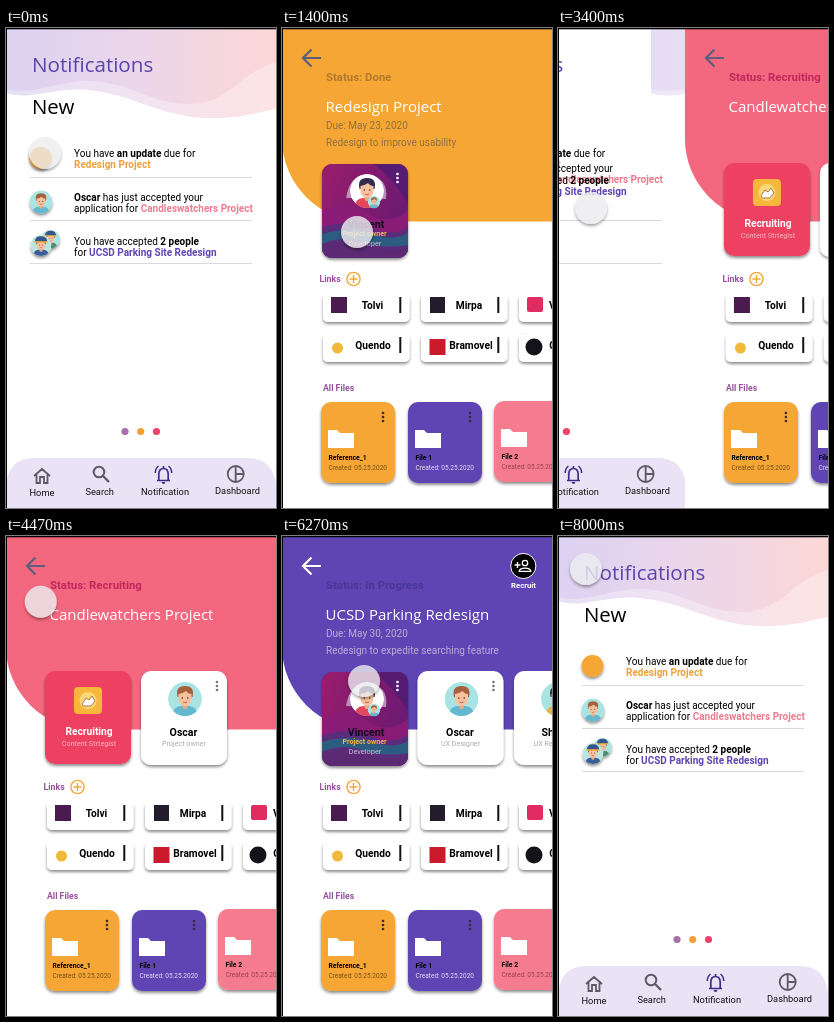
An HTML page that plays this animation: 270x480 px, repeating every 8.54 s.

```html
<!DOCTYPE html>
<html lang="en">
<head>
<meta charset="utf-8">
<title>Project notifications</title>
<style>
  html, body { margin: 0; width: 100%; height: 100%; overflow: hidden; background: #fff; }
  svg { display: block; width: 270px; height: 480px; font-family: Roboto, Arial, sans-serif; }
  .title { font-family: "Open Sans", "Noto Sans", sans-serif; font-weight: 500; }
  .b { font-weight: 700; }
  .m { text-anchor: middle; }
  text { white-space: pre; }
</style>
</head>
<body>
<svg id="stage" viewBox="0 0 270 480" xmlns="http://www.w3.org/2000/svg"></svg>
<script>
const LOOP = 8540, WIDTH = 269, SLIDE = 460;
const ORANGE = '#f5a635', PURPLE = '#5e45b3', PINK = '#f57b8e', RED = '#ee4161', SLATE = '#5a5f7d';

const text = (x, y, s, size, fill = '#000', cls = '') =>
  `<text x="${x}" y="${y}" font-size="${size}" fill="${fill}" class="${cls}">${s}</text>`;
const bold = (s, fill = '#000') => `<tspan class="b" fill="${fill}">${s}</tspan>`;
const rect = (x, y, w, h, r, fill, more = '') =>
  `<rect x="${x}" y="${y}" width="${w}" height="${h}" rx="${r}" fill="${fill}" ${more}/>`;
const circle = (x, y, r, fill, more = '') => `<circle cx="${x}" cy="${y}" r="${r}" fill="${fill}" ${more}/>`;
const path = (d, fill = 'none', more = '') => `<path d="${d}" fill="${fill}" ${more}/>`;
const line = (d, color, width) => path(d, 'none', `stroke="${color}" stroke-width="${width}"`);
const at = (x, y, s, scale = 1) => `<g transform="translate(${x} ${y}) scale(${scale})">${s}</g>`;
const menu = (x, y, fill) => [0, 4, 8].map(d => circle(x, y + d, 1.35, fill)).join('');
const shadow = 'filter="url(#shadow)"';

const defs = `<defs>
  <filter id="shadow" x="-20%" y="-20%" width="140%" height="150%">
    <feDropShadow dx="0" dy="2" stdDeviation="1.6" flood-opacity=".45"/></filter>
  <linearGradient id="sky"><stop offset="0" stop-color="#d8cdf0"/><stop offset=".5" stop-color="#ead2e8"/>
    <stop offset="1" stop-color="#fcd3d2"/></linearGradient>
  <linearGradient id="dusk" x2="1" y2=".4"><stop offset="0" stop-color="#9a1d6c"/>
    <stop offset="1" stop-color="#6c1a72"/></linearGradient>
  <clipPath id="face"><circle r="17"/></clipPath>
  <clipPath id="card"><rect x="40" y="136" width="86" height="94" rx="10"/></clipPath>
  <clipPath id="links"><rect x="30" y="268" width="240" height="80"/></clipPath>
</defs>`;

// Portrait centred on 0,0 with radius 17
const portrait = (hair, shirt, back, hat = '') => `<g clip-path="url(#face)">
  ${circle(0, 0, 17, back)}
  ${path('M-13 18Q-12 7 -4 7H4Q12 7 13 18Z', shirt)}
  ${rect(-2.5, 3, 5, 7, 2, '#e9a883')}
  ${path('M-7.5 -2Q-10 -13 0 -13Q10 -13 7.5 -2Z', hair)}
  ${path('M-6.5 -5Q-3 -5 1 -8Q3 -5 6.5 -5V0Q6 6 0 7Q-6 6 -6.5 0Z', '#f7c19e')}
  ${circle(-2.7, -1, .8, '#432')}${circle(2.7, -1, .8, '#432')}
  ${line('M-2 3Q0 4.5 2 3', '#b45', .8)}${hat}</g>`;
const oscar = portrait('#a5603d', '#63b7cf', '#a9e3e2');
const vincent = portrait('#342a4b', '#e2475d', '#fff');
const cap = path('M-10 -6Q-10 -15 0 -15Q10 -15 10 -6Z', '#34568c') + rect(-11, -7, 22, 2.5, 1, '#f2b33d');

function notifications() {
  const nav = (x, y, s) => text(x, y, s, 9.3, '#111', 'm');
  const row = (id, y, a, b) => `<g id="${id}">${text(68, y, a, 10)}${text(68, y + 11, b, 10)}</g>`;
  const divider = y => line(`M24 ${y}H246`, '#d9d9de', 1);
  const gray = '#5d5a66', night = '#3b2d87';
  return rect(0, 0, 270, 480, 0, '#fff') + '<g id="sheet">' +
    path('M0 0H270V81C246 86 230 91 200 90C152 88 126 66 82 62C48 59 24 73 0 65Z', 'url(#sky)', 'opacity=".62"') +
    path('M0 0H270V34C235 43 224 76 184 76C142 76 122 52 80 53C46 54 28 68 0 61Z', 'url(#sky)', 'opacity=".75"') +
    '</g>' +
    text(26, 44, 'Notifications', 20.6, '#5944aa', 'title') + text(26, 86, 'New', 20.4, '#000', 'title') +
    divider(149.5) + divider(192.5) + divider(235.5) +
    row('first', 129, `You have ${bold('an update')} due for`, bold('Redesign Project', '#f0a038')) +
    row('second', 173, `${bold('Oscar')} has just accepted your`, `application for ${bold('Candleswatchers Project', '#f17b91')}`) +
    row('third', 216.5, `You have accepted ${bold('2 people')}`, `for ${bold('UCSD Parking Site Redesign', PURPLE)}`) +
    circle(34.5, 130, 11, ORANGE, shadow) +
    `<g ${shadow}>${at(35, 174, oscar, .67)}</g>` +
    `<g ${shadow}>${at(44.5, 211, portrait('#74452f', '#4d8c74', '#a9e3e2', cap), .55)}` +
    `${at(35, 217.5, portrait('#5a3a2c', '#395c9c', '#bce5df', cap), .62)}</g>` +
    circle(119, 403.5, 3.6, '#a670ab') + circle(134.7, 403.5, 3.6, '#f4a035') + circle(150.5, 403.5, 3.6, '#ee426b') +
    path('M0 480V457Q3 430 28 430H242Q267 430 270 457V480Z', '#eae3f6') +
    line('M28 448L36 441L44 448M30.5 446.5V455H34V449H38V455H41.5V446.5', gray, 1.8) +
    circle(93, 444, 5.3, 'none', `stroke="${gray}" stroke-width="2"`) + line('M97 448L103 454', gray, 2.3) +
    line('M151 452.5H164M152.8 452V446Q153 440.5 157.5 440.5Q162 440.5 162.2 446V452M157.5 440.5V438', night, 1.7) +
    line('M149.3 445Q149.3 440.5 152.5 438M165.7 445Q165.7 440.5 162.5 438', night, 1.5) +
    path('M155.5 454H159.5Q159 456 157.5 456Q156 456 155.5 454Z', night) +
    circle(229.7, 446, 8, 'none', `stroke="${gray}" stroke-width="1.8"`) +
    line('M229.7 438V454M229.7 446H237.7', gray, 1.8) +
    nav(36, 468, 'Home') + nav(93.7, 467, 'Search') + nav(159, 467, 'Notification') + nav(231.5, 466, 'Dashboard');
}

const ownerCard = () => rect(40, 136, 86, 94, 10, '#4a2070', shadow) +
  `<g clip-path="url(#card)">${rect(40, 136, 86, 94, 0, 'url(#dusk)')}
  ${path('M92 136H127V176Q112 152 92 136Z', '#4a1c74', 'opacity=".7"')}
  ${path('M40 184Q62 168 84 184T127 182V212H40Z', '#8a1c78')}
  ${path('M40 200Q66 190 88 200T127 198V230H40Z', '#5a2c7c')}
  ${path('M40 206Q66 198 90 206T127 204V217Q100 221 80 214T40 216Z', '#2c5c80')}
  ${path('M40 216Q66 212 90 219T127 217V230H40Z', '#5c2a74')}</g>` +
  path('M64 170Q68 146 85 147Q107 149 104 171Z', '#e5edf5', 'opacity=".55"') +
  at(85, 163, vincent) + at(92, 174, oscar, .37) + menu(115.5, 146, '#fff') +
  text(84, 199.5, 'Vincent', 10.6, '#120b1c', 'b m') + text(82.5, 208, 'Project owner', 7.1, '#f8b344', 'b m') +
  text(83, 218, 'Developer', 7.4, '#c8bfd5', 'm');

const memberCard = (x, name, role, face) => rect(x, 135, 86, 94, 10, '#fff', shadow) +
  at(x + 44, 163, face) + menu(x + 76, 146, '#77757d') +
  text(x + 42.5, 199.5, name, 10.6, '#000', 'b m') + text(x + 43, 210, role, 7.2, '#aaa8ae', 'm');

const recruitCard = () => rect(39, 135, 86, 93, 10, RED, shadow) +
  rect(68, 151, 28, 27, 4, '#f7b73c') + circle(82, 164.5, 8.5, '#fbd77c') +
  path('M76 168L80 162L83 164L86 160L89 165L85 170H77Z', '#fff', 'stroke="#a8692b" stroke-width=".9"') +
  text(83, 199, 'Recruiting', 10.2, '#fff', 'b m') + text(83, 210, 'Content Strtegist', 7.2, '#ffb3c0', 'm');

const recruitButton = () => circle(241.3, 30, 12.6, '#000', 'stroke="#fff" stroke-width="1"') +
  circle(243, 27, 2.7, 'none', 'stroke="#fff" stroke-width="1.3"') +
  path('M237.2 35.3Q237.6 32.2 243 32.2Q248.4 32.2 248.8 35.3Z', 'none', 'stroke="#fff" stroke-width="1.3"') +
  line('M232.5 29H238.5M235.5 26V32', '#fff', 1.4) + text(241.5, 52, 'Recruit', 7.7, '#fff', 'b m');

function chip(x, y, name, mark, labelX) {
  return rect(x, y - 2, 86.5, 28, 5, '#fff', shadow) + mark +
    text(labelX, y + 13, name, 10.2, '#000', 'b m') + line(`M${x + 77.3} ${y + 1}V${y + 17}`, '#111', 2);
}

function links() {
  return text(37.5, 254, 'Links', 8.8, '#98509f', 'b') +
    circle(71.5, 251, 6.6, 'none', `stroke="${ORANGE}" stroke-width="1.4"`) +
    line('M67.5 251H75.5M71.5 247V255', ORANGE, 1.4) +
    `<g clip-path="url(#links)">` +
    chip(41, 268, 'Tolvi', rect(49, 269, 16, 16, 0, '#4b1b4f'), 90.5) +
    chip(139, 268, 'Mirpa', rect(148, 269, 15, 16, 0, '#231d2b'), 187) +
    chip(237, 268, 'Velda', rect(245, 269, 16, 15, 2, '#e12c62'), 280) +
    chip(41, 308, 'Quendo', circle(55.5, 320, 5.5, '#f1b93a'), 91) +
    chip(139, 308, 'Bramovel', rect(147.5, 311, 16, 16, 0, '#cb1a2c'), 189) +
    chip(237, 308, 'Corbo', circle(252, 319, 8.5, '#15131a'), 281) + '</g>';
}

function file(x, y, color, name, ink) {
  return rect(x, y, 74, 81, 10, color, shadow) + menu(x + 62, y + 11, '#3d2b35') +
    path(`M${x + 7} ${y + 28}h9l3 3h14v15h-26z`, '#fff') +
    text(x + 7.5, y + 58, name, 6.8, '#000', 'b') + text(x + 7.5, y + 68, 'Created: 05.25.2020', 6.5, ink);
}

const files = () => text(41, 363, 'All Files', 8.7, '#98509f', 'b') +
  file(39, 374, ORANGE, 'Reference_1', '#795016') +
  file(126, 374, PURPLE, 'File 1', '#e2dcf4') +
  file(212, 373, PINK, 'File 2', '#98424f');

function project(p) {
  return rect(0, 0, 270, 480, 0, '#fff') +
    path('M0 0H270V193.5H83A83 83 0 0 1 0 110.5Z', p.color) +
    line('M39 30H21M29.5 21.5L21 30L29.5 38.5', p.arrow, 2.2) +
    text(44, 53, `Status: ${p.status}`, 11.4, p.statusInk, 'b') +
    text(43.5, 83.5, p.title, 15, '#fff', 'title') +
    text(44, 101, p.due, 10, p.ink) + text(44, 118, p.about, 10, p.ink) +
    p.cards + links() + files();
}

const pages = [
  { color: ORANGE, arrow: SLATE, status: 'Done', statusInk: '#b17a2d', title: 'Redesign Project', ink: '#8f703f',
    due: 'Due: May 23, 2020', about: 'Redesign to improve usability', cards: ownerCard() },
  { color: '#f4687f', arrow: SLATE, status: 'Recruiting', statusInk: '#c0285c', title: 'Candlewatchers Project',
    ink: '#fff', due: '', about: '', cards: recruitCard() + memberCard(135, 'Oscar', 'Project owner', oscar) },
  { color: PURPLE, arrow: '#fff', status: 'In Progress', statusInk: '#4a3696', title: 'UCSD Parking Redesign',
    ink: '#b8afd8', due: 'Due: May 30, 2020', about: 'Redesign to expedite searching feature',
    cards: ownerCard() + memberCard(135.5, 'Oscar', 'UX Designer', oscar) +
      memberCard(232, 'Shona', 'UX Researcher', portrait('#3a2b35', '#eab04d', '#a9e3e2')) + recruitButton() }
];

const stage = document.getElementById('stage');
stage.innerHTML = defs + `<g id="home">${notifications()}</g>` +
  pages.map((p, i) => `<g id="page${i}">${project(p)}</g>`).join('') +
  `<g id="touch" ${shadow}>${circle(0, 0, 16, '#ececef')}</g>` +
  rect(0, 0, 1, 480, 0, '#000') + rect(0, 0, 270, 1.3, 0, '#000');

const [home, sheet, second, third, touch] =
  ['home', 'sheet', 'second', 'third', 'touch'].map(id => document.getElementById(id));
const views = pages.map((_, i) => document.getElementById('page' + i));

// Start times of the push and the return for each project
const visits = [[200, 2157], [3257, 4750], [5560, 7500]];

// time, x, y, opacity
const taps = [
  [0, 39, 125, .78], [500, 39, 125, .78], [1000, 62, 165, .78], [1350, 75, 204, .82], [1500, 75, 204, .82],
  [1980, 24, 32, .82], [2400, 24, 32, .82], [2950, 33, 180, .82], [3550, 33, 180, .82], [4100, 60, 160, .82],
  [4600, 26, 33, .82], [5050, 26, 33, .82], [5450, 107, 218, .6], [5600, 107, 218, .6], [6000, 111, 212, .8],
  [6130, 93, 176, .8], [6530, 62, 88, .8], [6800, 29, 34, .82], [7480, 29, 34, .82], [7700, 28, 33, .82],
  [LOOP, 28, 33, .82]
];

const clamp = v => Math.min(1, Math.max(0, v));
const easeOut = v => 1 - (1 - v) ** 2;
const slide = (t, start) => easeOut(clamp((t - start) / SLIDE));
const move = (el, x, y = 0) => el.setAttribute('transform', `translate(${x.toFixed(2)} ${y.toFixed(2)})`);

function touchAt(t) {
  const i = taps.findIndex(k => k[0] > t), a = taps[i - 1], b = taps[i];
  const p = (t - a[0]) / (b[0] - a[0]);
  return a.map((v, j) => v + (b[j] - v) * p);
}

// The second push also gathers the lower rows and sweeps the header aside
function gather(t) {
  const [enter, leave] = visits[1];
  const p = t < leave ? slide(t, enter) : 0;
  move(sheet, 445 * p);
  sheet.setAttribute('opacity', 1 - .5 * p);
  move(second, 0, -54 * p);
  move(third, 0, -115 * p);
}

function draw(t) {
  let shown = 0;
  visits.forEach(([enter, leave], i) => {
    const p = slide(t, enter) - slide(t, leave);
    shown += p;
    views[i].style.display = p > 0 ? '' : 'none';
    move(views[i], WIDTH * (1 - p));
  });
  move(home, -WIDTH * shown);
  gather(t);
  const [, x, y, alpha] = touchAt(t);
  move(touch, x, y);
  touch.setAttribute('opacity', alpha.toFixed(3));
}

function tick() {
  draw(performance.now() % LOOP);
  requestAnimationFrame(tick);
}
tick();
</script>
</body>
</html>
```
